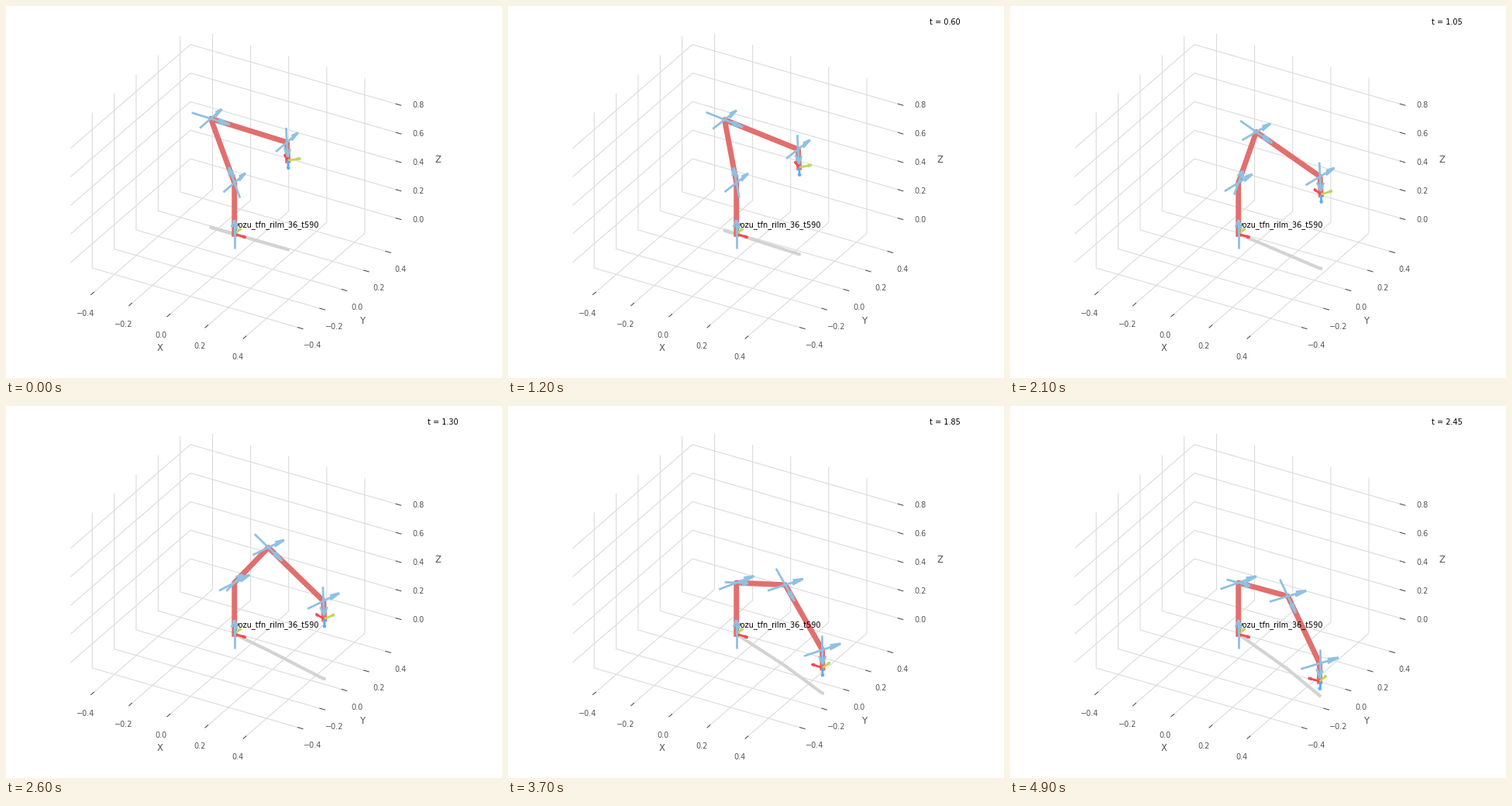
These frames come from a looping animation (640 by 480 pixels, 5 s). A matplotlib script:

```python
import numpy as np
import matplotlib.pyplot as plt
from matplotlib.animation import FuncAnimation
from matplotlib.collections import LineCollection

WIDTH, HEIGHT, DPI = 640, 480, 100
FRAMES, INTERVAL, DT = 50, 100, 0.05
FONT = "DejaVu Sans"

# Orthographic view, 30 degrees up and 60 degrees round, z squeezed to 3/4
SCALE = 283.6
SCREEN_CENTER = np.array([294.49, 233.51])
BOX_CENTER = np.array([0.0283, -0.0508, 0.375])
BOX_SIZE = 308.9 / SCALE
LOW, HIGH = BOX_CENTER - BOX_SIZE / 2, BOX_CENTER + BOX_SIZE / 2
COS30 = np.sqrt(3) / 2
VIEW = SCALE * np.array([[COS30, 0.25], [0.5, -COS30 / 2], [0, -0.75 * COS30]])
TO_CAMERA = np.array([COS30 / 2, -0.75, 0.375])

RED, GREEN, BLUE = "#F84752", "#BADA55", "#54AEFF"
LINK, JOINT, SHADOW = "#E16F6D", "#8FC1E2", "lightgrey"
GRID, INK = "#dbdbdb", "#555555"

# Seven revolute joints: turning axis and the rise of the link before each
JOINT_AXES = (2, 1, 2, 1, 2, 1, 2)
RISES = (0, 0.36, 0, 0.42, 0, 0.4, 0)
TOOL = 0.126


def project(points):
    return SCREEN_CENTER + (np.asarray(points, float) - BOX_CENTER) @ VIEW


def rotation(axis, angle):
    c, s = np.cos(angle), np.sin(angle)
    if axis == 2:
        return np.array([[c, -s, 0], [s, c, 0], [0, 0, 1]])
    return np.array([[c, 0, s], [0, 1, 0], [-s, 0, c]])


def solve_arm(tool_at, tool_rot, swivel):
    """Joint angles for a tool pose; swivel turns the elbow about the arm."""
    shoulder = np.array([0, 0, 0.36])
    upper, lower = 0.42, 0.4
    reach = tool_at - TOOL * tool_rot[:, 2] - shoulder
    dist = np.linalg.norm(reach)
    w = reach / dist
    side = np.cross([0, 0, 1], w)
    side /= np.linalg.norm(side)
    up = np.cross(w, side)
    cos_a = (upper**2 + dist**2 - lower**2) / (2 * upper * dist)
    u = cos_a * w + np.sqrt(1 - cos_a**2) * (
        np.cos(swivel) * up + np.sin(swivel) * side)

    q1, q2 = np.arctan2(u[1], u[0]), np.arccos(u[2])
    rot = rotation(2, q1) @ rotation(1, q2)
    fore = rot.T @ (reach - upper * u) / lower
    q3, q4 = np.arctan2(fore[1], fore[0]), np.arccos(fore[2])
    m = (rot @ rotation(2, q3) @ rotation(1, q4)).T @ tool_rot
    q5, q6 = np.arctan2(m[1, 2], m[0, 2]), np.arccos(m[2, 2])
    q7 = np.arctan2(m[2, 1], -m[2, 0])
    return np.array([q1, q2, q3, q4, q5, q6, q7])


START = np.array([0, -0.3, 0, 1.9, 0, 1.5, np.pi / 4])
GOAL = solve_arm(np.array([0.6, -0.3, 0.1]), np.diag([-1.0, 1.0, -1.0]), 0.05)


def pose(frame):
    s = frame / (FRAMES - 1)
    return START + (GOAL - START) * (10 * s**3 - 15 * s**4 + 6 * s**5)


def arrow(tail, vec):
    """Shaft and two barbs at 15 degrees, in the vertical plane of vec."""
    flat = np.hypot(vec[0], vec[1])
    axis = np.array([vec[1], -vec[0], 0]) / flat if flat > 1e-9 else np.array([0, 1.0, 0])
    tip = tail + vec
    along = np.cos(np.pi / 12) * vec
    across = np.sin(np.pi / 12) * np.cross(axis, vec)
    return np.array([[tail, tip]] + [
        [tip - 0.3 * (along + k * across), tip] for k in (1, -1)])


def triad(at, rot):
    return [(arrow(at, 0.06 * rot[:, i]), color)
            for i, color in enumerate((RED, GREEN, BLUE))]


def arm(angles):
    at, rot = np.zeros(3), np.eye(3)
    points, arrows = [at], triad(at, rot)
    for axis, rise, angle in zip(JOINT_AXES, RISES, angles):
        at = at + rise * rot[:, 2]
        rot = rot @ rotation(axis, angle)
        if rise:
            points.append(at)
        direction = rot[:, axis]
        arrows.append((arrow(at - 0.1 * direction, 0.2 * direction), JOINT))
    at = at + TOOL * rot[:, 2]
    points.append(at)
    arrows += triad(at, rot)
    arrows.sort(key=lambda a: (a[0] @ TO_CAMERA).max())
    return np.array(points), arrows


fig = plt.figure(figsize=(WIDTH / DPI, HEIGHT / DPI), dpi=DPI, facecolor="white")
ax = fig.add_axes([0, 0, 1, 1])
ax.set(xlim=(0, WIDTH), ylim=(HEIGHT, 0))
ax.axis("off")


def write(at, text, color="black", size=7, **style):
    return ax.text(*at, text, color=color, size=size, family=FONT, **style)


def draw_axes():
    (x0, y0, z0), (x1, y1, z1) = LOW, HIGH
    cx, cy, cz = BOX_CENTER
    grid, ticks = [], []

    def mark(value, edge, tick_dir, away):
        edge, tick_dir, away = (np.array(v, float) for v in (edge, tick_dir, away))
        ticks.append(project([edge - 0.008 * BOX_SIZE * tick_dir,
                              edge + 0.016 * BOX_SIZE * tick_dir]))
        label = f"{value:.1f}".replace("-", "\u2212")
        write(project(edge + 0.0639 * BOX_SIZE * away), label, INK, ha="center", va="top")

    def title(name, edge, away):
        at = project(np.array(edge) + 0.1222 * BOX_SIZE * np.array(away))
        write(at, name, INK, 8.4, ha="center", va="center")

    x_away, y_away, z_away = (0, -1, -1), (1, 0, -1), (1, 1, 0)
    for v in (-0.4, -0.2, 0.0, 0.2, 0.4):
        grid.append(project([(v, y0, z0), (v, y1, z0), (v, y1, z1)]))
        grid.append(project([(x1, v, z0), (x0, v, z0), (x0, v, z1)]))
        mark(v, (v, y0, z0), (0, -1, 0), x_away)
        mark(v, (x1, v, z0), (1, 0, 0), y_away)
    for v in (0.0, 0.2, 0.4, 0.6, 0.8):
        grid.append(project([(x0, y0, v), (x0, y1, v), (x1, y1, v)]))
        mark(v, (x1, y1, v), (1, 0, 0), z_away)
    title("X", (cx, y0, z0), x_away)
    title("Y", (x1, cy, z0), y_away)
    title("Z", (x1, y1, cz), z_away)

    ax.add_collection(LineCollection(grid, colors=GRID, linewidths=0.8, zorder=1))
    ax.add_collection(LineCollection(ticks, colors=INK, linewidths=0.8,
                                     capstyle="projecting", zorder=1))


draw_axes()
shadow, = ax.plot([], [], color=SHADOW, lw=3, zorder=2)
links, = ax.plot([], [], color=LINK, lw=5, zorder=2.1)
write(project((0, 0, 0.05)), "vozu_tfn_rilm_36_t590", zorder=3)
quivers = LineCollection([], linewidths=2, zorder=4)
ax.add_collection(quivers)
clock = write((544, 24), "", zorder=5)


def update(frame):
    points, arrows = arm(pose(frame))
    links.set_data(*project(points).T)
    shadow.set_data(*project(points * [1, 1, 0]).T)
    quivers.set_segments([project(seg) for segs, _ in arrows for seg in segs])
    quivers.set_color([color for segs, color in arrows for _ in segs])
    clock.set_text(f"t = {frame * DT:.2f}" if frame else "")
    return links, shadow, quivers, clock


anim = FuncAnimation(fig, update, frames=FRAMES, interval=INTERVAL,
                     repeat=True, repeat_delay=0)
plt.show()
```
